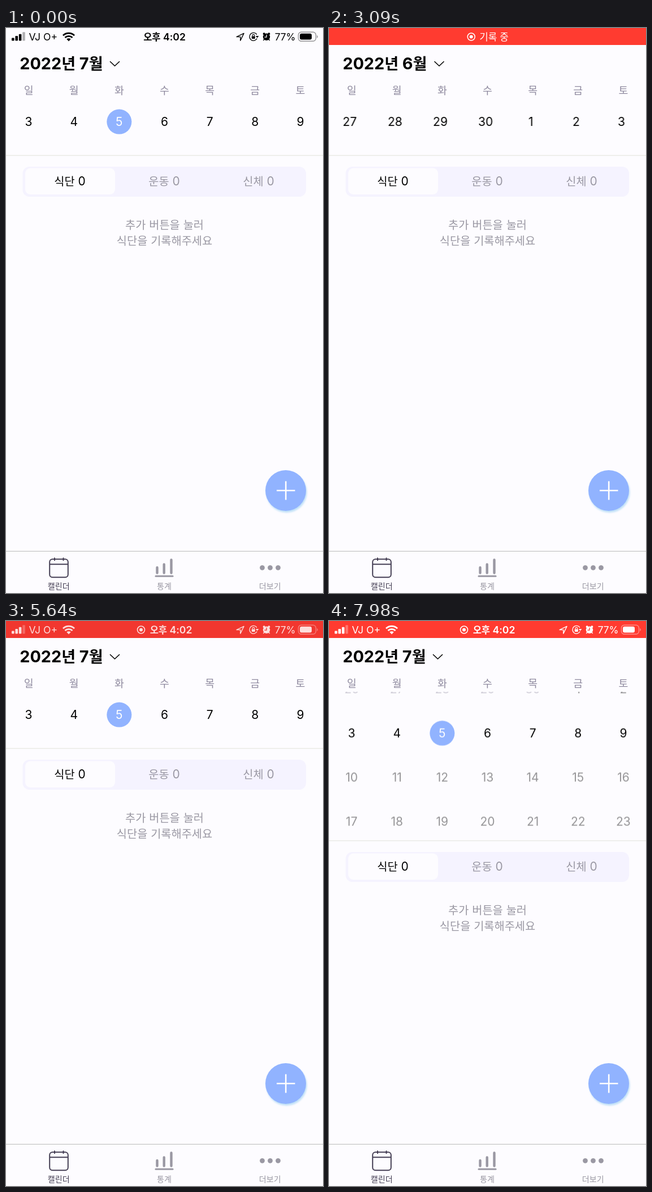
Animation, 561 px wide and 998 px high, one loop 8 s. Source, as an HTML page:

```html
<!DOCTYPE html>
<html lang="ko">
<head>
<meta charset="utf-8">
<title>식단 달력</title>
<style>
html, body { margin: 0; width: 100%; height: 100%; overflow: hidden; background: #fdfcff; }
svg { display: block; width: 100%; height: 100%; }
text { font-family: Inter, "Noto Sans CJK KR", "Noto Sans CJK", sans-serif; white-space: pre; }
.ko { font-size: .94em; font-family: "Noto Sans CJK KR", "Noto Sans CJK", sans-serif; }
.anim { animation: 8s linear infinite; }

.swipe { animation-name: swipe; }
@keyframes swipe {
  0%, 32.5% { transform: translateX(0); animation-timing-function: ease-in; }
  35.4% { transform: translateX(260px); }
  38.625% { transform: translateX(477px); animation-timing-function: ease-out; }
  42.5% { transform: translateX(561px); }
  55% { transform: translateX(561px); animation-timing-function: ease-in; }
  58.25% { transform: translateX(297px); animation-timing-function: ease-out; }
  64%, 100% { transform: translateX(0); }
}

/* Pulling down reveals the month: rows shift one row, the panel five. */
.rows { animation-name: rows; }
.panel { animation-name: panel; }
.others { animation-name: others; }
.rows, .panel, .others { --pull: cubic-bezier(.4, 0, .75, .75); }
@keyframes rows {
  0%, 94.5% { transform: translateY(0); animation-timing-function: var(--pull); }
  99.7%, 100% { transform: translateY(32.6px); }
}
@keyframes panel {
  0%, 94.5% { transform: translateY(0); animation-timing-function: var(--pull); }
  99.7%, 100% { transform: translateY(163px); }
}
@keyframes others {
  0%, 94.5% { opacity: 0; animation-timing-function: var(--pull); }
  99.7%, 100% { opacity: .418; }
}

.july { animation-name: july; }
.june { animation-name: june; }
@keyframes july {
  0%, 35.6% { opacity: 1; }
  35.61%, 57.9% { opacity: 0; }
  57.91%, 100% { opacity: 1; }
}
@keyframes june {
  0%, 35.6% { opacity: 0; }
  35.61%, 57.9% { opacity: 1; }
  57.91%, 100% { opacity: 0; }
}

.banner { animation-name: show, pulse; }
@keyframes show {
  0%, 5.625% { opacity: 0; }
  10.19%, 100% { opacity: 1; }
}
@keyframes pulse {
  0%, 11% { fill: #ff3b30; animation-timing-function: ease-in-out; }
  23.5% { fill: #d8312c; animation-timing-function: ease-in-out; }
  38.6% { fill: #ff3b30; animation-timing-function: ease-in-out; }
  53.9% { fill: #d8312c; animation-timing-function: ease-in-out; }
  67% { fill: #ff3b30; animation-timing-function: ease-in-out; }
  75.5% { fill: #d8312c; animation-timing-function: ease-in-out; }
  95%, 100% { fill: #ff3b30; }
}
.idle { animation-name: idle; }
.notice { animation-name: notice; }
.live { animation-name: live; }
@keyframes idle {
  0%, 5.6% { opacity: 1; }
  7.5%, 100% { opacity: 0; }
}
@keyframes notice {
  0%, 5.6% { opacity: 0; }
  7.8%, 67% { opacity: 1; }
  70%, 100% { opacity: 0; }
}
@keyframes live {
  0%, 68% { opacity: 0; }
  71%, 100% { opacity: 1; }
}
</style>
</head>
<body>
<svg id="stage" viewBox="0 0 561 998"></svg>
<script>
const PAGE = '#fdfcff', BLUE = '#91b3ff', GRAY = '#9a98a3', INK = '#453f54';
const COL = 561 / 7, ROW = 78;
const colX = i => COL * (i + .5);

function text(x, y, str, size, fill, anchor = 'middle', weight = 400) {
  const runs = str.replace(/[가-힣]+/g, '<tspan class="ko">$&</tspan>');
  return `<text x="${x}" y="${y}" font-size="${size}" fill="${fill}" text-anchor="${anchor}" font-weight="${weight}">${runs}</text>`;
}
const group = (cls, body) => `<g class="anim ${cls}">${body}</g>`;
const rect = (x, y, w, h, fill, rx = 0, extra = '') =>
  `<rect x="${x}" y="${y}" width="${w}" height="${h}" rx="${rx}" fill="${fill}" ${extra}/>`;
const circle = (x, y, r, fill, extra = '') =>
  `<circle cx="${x}" cy="${y}" r="${r}" fill="${fill}" ${extra}/>`;
const line = (d, color, width, extra = '') =>
  `<path d="${d}" fill="none" stroke="${color}" stroke-width="${width}" ${extra}/>`;

// Day cells of one week; day 1 is the first of July.
function week(first, row, dimOutside) {
  let out = '';
  for (let i = 0; i < 7; i++) {
    const day = first + i, x = colX(i), y = 165.6 + ROW * row;
    const label = day < 1 ? day + 30 : day > 31 ? day - 31 : day;
    const outside = day < 1 || day > 31;
    if (day === 5) out += circle(x, y, 22, BLUE);
    out += text(x, y + 7.6, String(label), 21, day === 5 ? '#fff' : outside && dimOutside ? '#8e8a9e' : '#000');
  }
  return out;
}

function calendar() {
  const hidden = [0, 2, 3, 4, 5].map(r => week(r * 7 - 4, r - 1, true)).join('');
  const strip = `<g transform="translate(-561 0)">${week(-4, 0)}</g>` + week(3, 0);
  return group('rows', group('others', hidden) + group('swipe', strip));
}

function panel() {
  return group('panel',
    rect(0, 225, 561, 900, PAGE) + rect(0, 224.5, 561, 1.2, '#e6e5e0') +
    rect(29.5, 245, 501.5, 53, '#f5f3ff', 12) + rect(34, 247.5, 159, 46.5, PAGE, 9) +
    text(113, 278.3, '식단 0', 21, '#000') +
    text(280, 278.3, '운동 0', 21, GRAY) +
    text(447, 278.3, '신체 0', 21, GRAY) +
    text(280.5, 355, '추가 버튼을 눌러', 21, GRAY) +
    text(280.5, 383, '식단을 기록해주세요', 21, GRAY));
}

function monthTitle(cls, month, chevronX) {
  return group(cls, text(24.3, 73, `2022년 ${month}월`, 28.8, '#000', 'start', 700) +
    line(`M${chevronX} 59l8.5 8 8.5-8`, '#000', 1.6));
}

function header() {
  return rect(0, 0, 561, 125, PAGE) +
    monthTitle('july', 7, 184) + monthTitle('june', 6, 186.5) +
    [...'일월화수목금토'].map((d, i) => text(colX(i), 117, d, 19.5, '#8f8a9f')).join('');
}

function addButton() {
  return circle(496.5, 820, 36, '#bfe0f7', 'filter="url(#soft)"') + circle(495, 817, 36, BLUE) +
    line('M479 817h32.5M495.2 800.5v33', '#fff', 2.6);
}

function tabBar() {
  const round = 'stroke-linecap="round"';
  return rect(0, 924, 561, 74, PAGE) + rect(0, 923.7, 561, 1.2, '#c4c3c2') +
    rect(77.2, 938.2, 32.6, 32, 'none', 5, `stroke="${INK}" stroke-width="2"`) +
    line('M77 947.3h33M86 935.5v5.5M101.5 935.5v5.5', INK, 2) +
    line('M267.5 953v9.5M279.7 947.5v15M292.5 939.5v23', GRAY, 4.4, round) +
    line('M265 968.2h30', GRAY, 3, round) +
    [453.5, 467.5, 481.5].map(x => circle(x, 953.3, 4.4, GRAY)).join('') +
    text(93.3, 991, '캘린더', 15, INK) + text(280, 991, '통계', 15, GRAY) + text(467.3, 991, '더보기', 15, GRAY);
}

const recordIcon = x => circle(x, 15.5, 6.5, 'none', 'stroke="#fff" stroke-width="1.6"') + circle(x, 15.5, 3, '#fff');

function statusBar(color, back, time) {
  const bars = [0, 1, 2, 3].map(i =>
    rect(10 + 6.4 * i, 17.5 - 3.4 * i, 4.6, 5 + 3.4 * i, color, 1, i === 3 ? 'opacity=".3"' : '')).join('');
  const wifi = line('M101 13.2a14.4 14.4 0 0 1 20 0M104.5 17a9.3 9.3 0 0 1 13 0', color, 2.9) +
    `<path d="M111 23.5l-3.7-3.9a5.4 5.4 0 0 1 7.4 0z" fill="${color}"/>`;
  const arrow = line('M408 15.6L421 9.4L414.8 22.2V15.6Z', color, 1.4, 'stroke-linejoin="round"');
  const lock = line('M443.8 11.5A7 7 0 1 0 444.2 18.5', color, 1.4) +
    `<path d="M441.8 14h5.6l-2.8 3.6z" fill="${color}"/>` +
    rect(434.8, 14.4, 6, 4.6, color, .8) + line('M436 14.5v-1.4a1.8 1.8 0 0 1 3.6 0v1.4', color, 1.2);
  const alarm = circle(461, 15.8, 6.2, color) + circle(456.7, 10.3, 2, color) + circle(465.3, 10.3, 2, color) +
    line('M456.8 20.2l-1.5 1.8M465.2 20.2l1.5 1.8', color, 1.5) + line('M461 11.8v4.4h-3.6', back, 1.3);
  const battery = rect(517.4, 7.2, 31, 16, 'none', 5, `stroke="${color}" stroke-width="1.4" opacity=".42"`) +
    rect(520, 9.8, 21, 10.8, color, 3) + `<path d="M550.2 12.5a3.2 3.2 0 0 1 0 5.6z" fill="${color}" opacity=".42"/>`;
  return bars + text(40.5, 21.8, 'VJ O+', 17.6, color, 'start') + wifi + time + arrow + lock + alarm +
    text(512.5, 21.8, '77%', 17.3, color, 'end') + battery;
}

function statusArea() {
  return group('idle', statusBar('#000', PAGE, text(280.5, 21.5, '오후 4:02', 17.6, '#000', 'middle', 600))) +
    rect(0, 0, 561, 30, '#ff3b30', 0, 'class="anim banner"') +
    group('notice', recordIcon(251.7) + text(292, 21.5, '기록 중', 18, '#fff')) +
    group('live', statusBar('#fff', '#f0382f', recordIcon(239) + text(292, 21.5, '오후 4:02', 17.6, '#fff', 'middle', 600)));
}

document.getElementById('stage').innerHTML =
  '<defs><filter id="soft"><feGaussianBlur stdDeviation="1.6"/></filter></defs>' +
  calendar() + panel() + header() + addButton() + tabBar() + statusArea();
</script>
</body>
</html>
```
